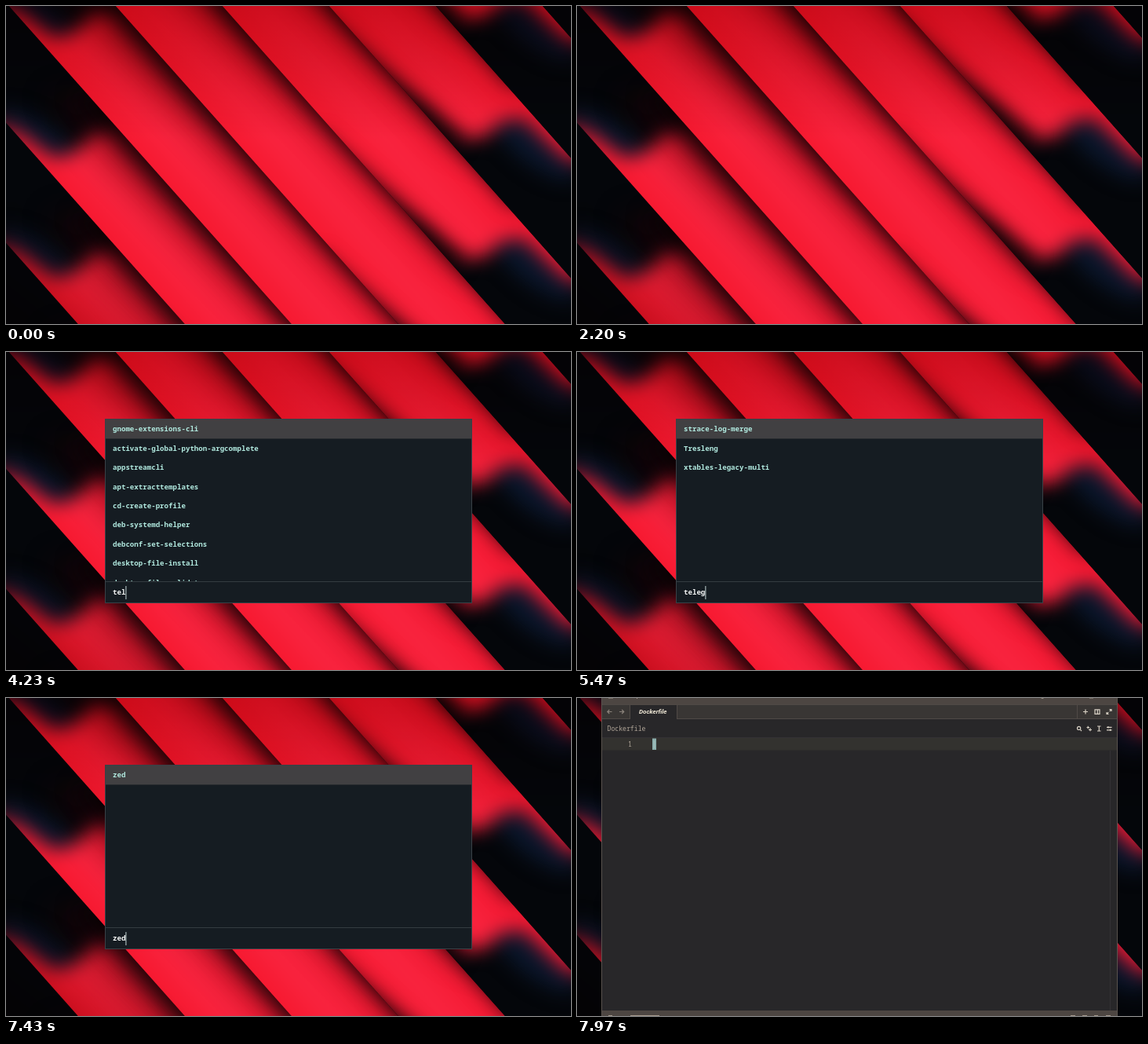
Animation, 720 px wide and 405 px high, one loop 8 s. Source, as an HTML page:

```html
<!DOCTYPE html>
<html lang="en">
<head>
<meta charset="utf-8">
<title>App launcher</title>
<style>
  html, body { margin: 0; width: 100%; height: 100%; overflow: hidden; background: #04060a; }
  svg { display: block; width: 100vw; height: 100vh; }
  text { white-space: pre; }
  .mono { font-family: "Noto Sans Mono", "DejaVu Sans Mono", monospace; }
  .cmd { font-size: 9.12px; font-weight: 700; fill: #b0e8de; }
  .icon { fill: none; stroke: #d8d0c4; stroke-width: 1.2; }
  .tint { mix-blend-mode: multiply; }
</style>
</head>
<body>
<svg viewBox="0 0 720 405" preserveAspectRatio="none">
  <defs>
    <linearGradient id="red" gradientUnits="userSpaceOnUse" x1="4" y1="0" x2="80" y2="-67.5">
      <stop offset="0" stop-color="#f6182f"/>
      <stop offset=".4" stop-color="#f92540"/>
      <stop offset="1" stop-color="#f31730"/>
    </linearGradient>
    <linearGradient id="top" x2="0" y2="1">
      <stop offset="0" stop-color="#d4667f"/>
      <stop offset="1" stop-color="#fff"/>
    </linearGradient>
    <linearGradient id="corner" gradientUnits="userSpaceOnUse" x1="60" y1="420" x2="140" y2="320">
      <stop offset="0" stop-color="#c47080"/>
      <stop offset="1" stop-color="#fff"/>
    </linearGradient>
    <filter id="soft" filterUnits="userSpaceOnUse" x="-150" y="-150" width="1100" height="1000" color-interpolation-filters="sRGB">
      <feGaussianBlur stdDeviation="12"/>
    </filter>
    <filter id="wide" filterUnits="userSpaceOnUse" x="-150" y="-150" width="1100" height="1000" color-interpolation-filters="sRGB">
      <feGaussianBlur stdDeviation="20"/>
    </filter>
    <clipPath id="edge"><path d="M-174-200H-38L931 890H795Z"/></clipPath>
    <clipPath id="rows"><rect x="127" y="86" width="466" height="206"/></clipPath>
    <g id="band" clip-path="url(#edge)">
      <path d="M-174-200H-38L931 890H795Z" fill="#04060a"/>
      <g filter="url(#soft)">
        <ellipse cx="42" cy="18" rx="62" ry="22" transform="rotate(35 42 18)" fill="#0a162b"/>
        <ellipse cx="674" cy="636" rx="66" ry="24" transform="rotate(38 674 636)" fill="#0a162b"/>
        <path fill="url(#red)" d="M-20-8L18 9L60 40Q88 38 102 20Q116 2 160-6L720 560L740 660L712 652L660 603
          Q632 600 618 618Q600 636 564 620L536 594L470 550L380 480L60 110L20 52Z"/>
      </g>
      <path d="M50-40L85 0L567 480L680 520L220-40Z" fill="#300006" opacity=".4" filter="url(#wide)"/>
      <g fill="#0a0204" filter="url(#soft)">
        <path d="M84-40L120 0L642 560L700 560L200-40Z" opacity=".85"/>
        <path d="M400 465L584 625L540 680L380 500Z" opacity=".75"/>
      </g>
    </g>
  </defs>

  <g id="wall"></g>
  <rect class="tint" width="720" height="170" fill="url(#top)"/>
  <rect class="tint" y="250" width="330" height="155" fill="url(#corner)"/>

  <g id="launcher">
    <rect x="126.5" y="85.5" width="467" height="234" fill="#151c22" stroke="#394147"/>
    <rect x="127" y="86" width="466" height="24.4" fill="#414042"/>
    <g id="list" class="mono cmd" clip-path="url(#rows)"></g>
    <path d="M127 292.5H593" stroke="#343c41"/>
    <rect id="mark" x="136" y="297" height="18" fill="#1c1a7c"/>
    <text id="query" class="mono cmd" x="136" y="309.3" style="fill:#f4f6f6"></text>
    <rect id="caret" y="298" width="1" height="17" fill="#c4d4d4"/>
  </g>

  <g id="editor">
    <rect x="31.5" y="-12" width="657" height="430" fill="#282729" stroke="#59524d"/>
    <rect x="32" y="-12" width="656" height="20" fill="#4d4642"/>
    <rect x="32" y="8" width="656" height="19" fill="#393634"/>
    <rect x="67" y="8" width="60" height="19" fill="#282729"/>
    <path d="M32 8.5H688M32 26.5H67M127 26.5H688M67.5 8V27M127.5 8V27M637.5 8V27" stroke="#504a46" fill="none"/>
    <rect x="32" y="50.5" width="656" height="16" fill="#33322f"/>
    <path d="M32 50.5H688M679.5 67V398" stroke="#343235" fill="none"/>
    <rect x="32" y="398" width="656" height="20" fill="#4d4642"/>
    <g font-family="Roboto, sans-serif" font-size="8" fill="#c8bcae">
      <text x="54" y="0">workspace</text>
      <text x="584" y="0">Sign in</text>
      <text x="79" y="20.3" font-style="italic" font-weight="600" fill="#f2ead8">Dockerfile</text>
    </g>
    <g class="mono" font-size="8.17" fill="#b0a598">
      <text x="38.5" y="41.8">Dockerfile</text>
      <text x="65" y="62">1</text>
    </g>
    <rect x="96" y="51.5" width="5" height="14.5" fill="#8db0ae"/>
    <path d="M98.5 54V64" stroke="#b7cfcb" stroke-width=".6"/>
    <path class="icon" style="stroke:#8b837b" d="M44.5 17.5H39M41.3 15L38.8 17.5L41.3 20M54 17.5H59.5M57.2 15L59.7 17.5L57.2 20"/>
    <path class="icon" d="M645 17.5H651M648 14.5V20.5M660 14.8H666V20.3H660ZM663.3 14.8V20.3
      M678.5 14.5H681V17M681 14.5L678.7 16.8M677.5 20.5H675V18M675 20.5L677.3 18.2
      M641.4 40.3L643 42M663 36H667.5M663 42H667.5M665.3 36V42M675 37.3H681.5M675 40.8H681.5M677 36V38.6M679.6 39.5V42
      M649.5 37.5H653M651.2 35.8V39.3M652 40.5H656M654 38.3V42.3"/>
    <circle class="icon" cx="639.6" cy="38.4" r="2.1"/>
    <path d="M40 0H46M653 0H658M40 404.5H45M68 404.5H105M629 404.5H635M644 404.5H650M659 404.5H664M674 404.5H680" stroke="#a69a8e"/>
  </g>
</svg>
<script>
const LOOP = 8000, CHAR = 5.472, ROW = 24.45;
const $ = id => document.getElementById(id);

const commands = `gnome-extensions-cli brave-browser activate-global-python-argcomplete
  appstreamcli apt-extracttemplates cd-create-profile deb-systemd-helper
  debconf-set-selections desktop-file-install desktop-file-validate
  strace-log-merge Tresleng xtables-legacy-multi zed`.split(/\s+/);

// time, query, whole query selected
const steps = [
  [2620, ''], [2790, 'b'], [2890, 'br'], [2990, 'bra'], [3090, 'brav'], [3200, 'brave'],
  [3500, 'brave', true], [3760, 't'], [3960, 'te'], [4160, 'tel'],
  [4300, 'tele'], [4480, 'teleg'], [6340, 'teleg', true],
  [6700, 'z'], [6880, 'ze'], [7080, 'zed']
];
const CLOSE = 7480, OPEN = 7850, OPEN_TIME = 110;

function matches(name, query) {
  let i = 0;
  for (const c of name.toLowerCase()) if (c === query[i]) i++;
  return i === query.length;
}

function drawWall() {
  let s = '';
  for (let k = -4; k <= 5; k++) s += `<use href="#band" y="${-153 * k}"/>`;
  $('wall').innerHTML = s;
}

let shown = null;
function drawLauncher(step) {
  if (step === shown) return;
  shown = step;
  $('launcher').style.display = step ? '' : 'none';
  if (!step) return;
  const [, query, selected] = step, width = query.length * CHAR;
  $('list').innerHTML = commands.filter(c => matches(c, query)).slice(0, 9)
    .map((c, i) => `<text x="136" y="${101.2 + i * ROW}">${c}</text>`).join('');
  $('query').textContent = query;
  $('mark').setAttribute('width', selected ? width : 0);
  $('caret').setAttribute('x', 136 + width);
  $('caret').style.display = selected ? 'none' : '';
}

function drawEditor(t) {
  const p = Math.min(1, Math.max(0, (t - OPEN) / OPEN_TIME));
  const ease = 1 - (1 - p) ** 3, scale = 0.9 + 0.1 * ease;
  const g = $('editor');
  g.style.display = p ? '' : 'none';
  g.setAttribute('opacity', ease);
  g.setAttribute('transform', `translate(360 203) scale(${scale}) translate(-360 -203)`);
}

function draw(t) {
  drawLauncher(t < CLOSE ? steps.findLast(s => s[0] <= t) : undefined);
  drawEditor(t);
}

const start = performance.now();
function frame() {
  draw((performance.now() - start) % LOOP);
  requestAnimationFrame(frame);
}
drawWall();
frame();
</script>
</body>
</html>
```
